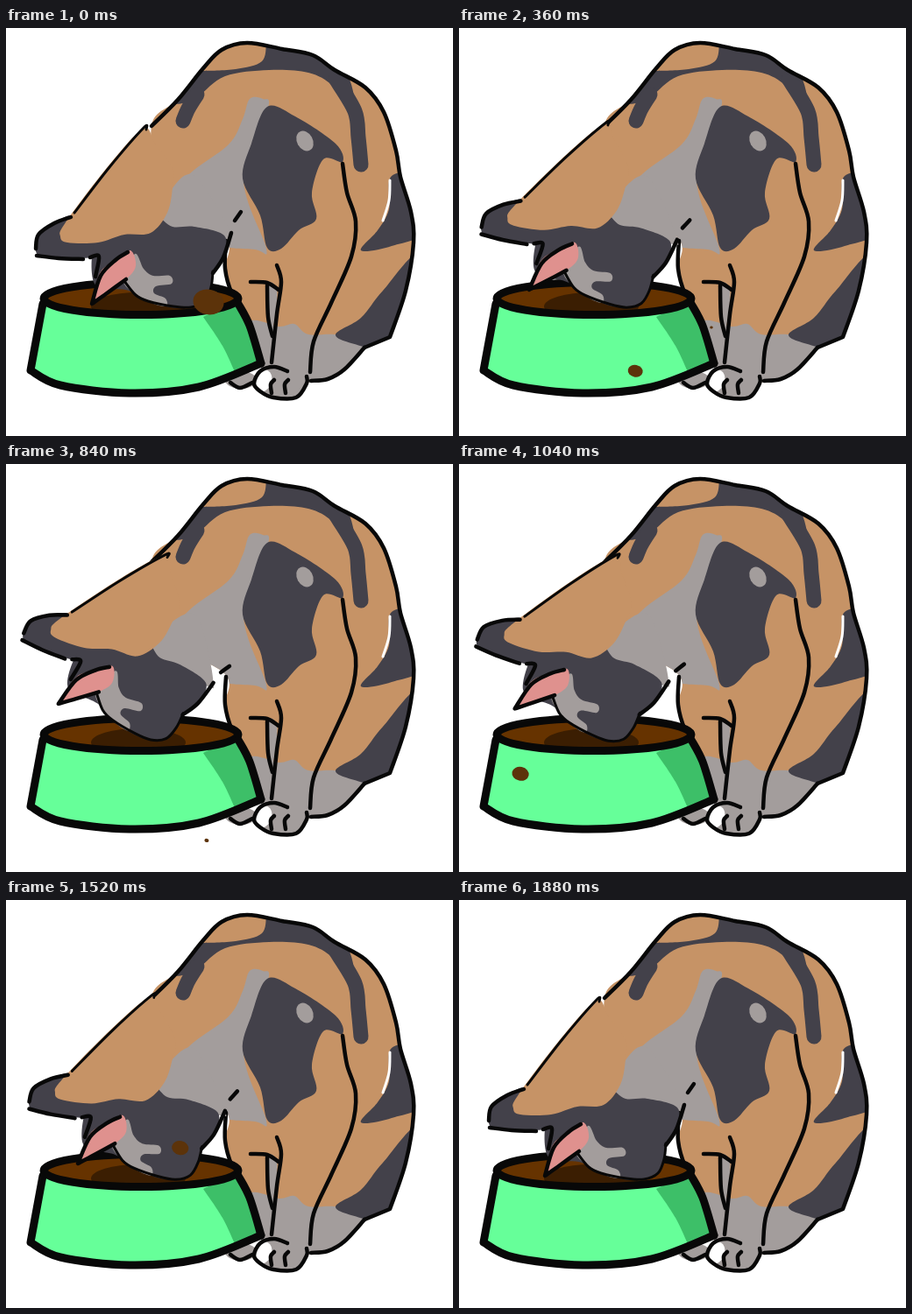
An HTML page with a canvas that plays this animation: 510x466 px, repeating every 1.92 s.

```html
<!DOCTYPE html>
<html>
<head>
<meta charset="utf-8">
<style>
html, body { margin: 0; width: 510px; height: 466px; overflow: hidden; background: #fff }
canvas { display: block }
</style>
</head>
<body>
<canvas id="stage" width="510" height="466"></canvas>
<script>
const c = document.getElementById('stage').getContext('2d');
const LOOP = 1920, STEP = 40, TURN = 20.2 * Math.PI / 180;
const ORANGE = '#c69366', DARK = '#43414a', GREY = '#a39d9c', PINK = '#df918e', INK = '#080808',
  GREEN = '#66ff99', SHADE = '#3dbf68', FOOD = '#663300', GRAVY = '#3b1e02', CRUMB = '#5c330a';

// Smooth curve through points; a repeated point makes a corner.
function curve(p, closed) {
  const n = p.length / 2, path = new Path2D();
  const at = i => {
    const k = closed ? (i + n) % n : Math.min(n - 1, Math.max(0, i));
    return [p[2 * k], p[2 * k + 1]];
  };
  path.moveTo(p[0], p[1]);
  for (let i = 0; i < (closed ? n : n - 1); i++) {
    const [[ax, ay], [x, y], [X, Y], [bx, by]] = [-1, 0, 1, 2].map(k => at(i + k));
    if (x === X && y === Y) continue;
    path.bezierCurveTo(x + (X - ax) / 6, y + (Y - ay) / 6, X - (bx - x) / 6, Y - (by - y) / 6, X, Y);
  }
  return path;
}
function shape(color, ...p) {
  c.fillStyle = color;
  c.fill(curve(p, true));
}
function stroke(color, width, ...p) {
  c.strokeStyle = color;
  c.lineWidth = width;
  c.stroke(curve(p));
}
const line = (...p) => stroke(INK, 4.5, ...p);
function oval(color, x, y, rx, ry, turn = 0) {
  c.fillStyle = color;
  c.beginPath();
  c.ellipse(x, y, rx, ry, turn, 0, 7);
  c.fill();
}

const BACK = [166,112, 196,82, 225,46, 246,25, 275,17, 315,24, 350,31, 375,48, 410,68,
  431,96, 445,140, 450,170, 462,210, 465,245, 456,300, 438,353, 438,353, 409,365];
const HAUNCH = [409,365, 386,390, 367,401, 348,403];
const FRONT = [331,422, 305,422, 284,408, 292,388, 275,335, 258,304, 250,275, 250,240, 180,195];

function drawBody() {
  oval(GREY, 268, 402, 18, 10);
  line(256,405, 267,411, 281,405);
  c.save();
  c.clip(curve([...BACK, ...HAUNCH, ...FRONT], true));
  c.fillStyle = ORANGE;
  c.fillRect(0, 0, 510, 466);
  shape(GREY, 270,341, 312,341, 329,338, 345,350, 380,351, 415,368, 380,440, 250,440);
  // chest and shoulder
  shape(GREY, 278,81, 293,81, 299,92, 271,172, 297,252, 284,253, 230,244, 188,200, 208,168, 254,133, 270,104);
  shape(DARK, 298,90, 330,101, 376,132, 384,153, 362,150, 349,188, 354,218, 334,231, 314,252, 298,251, 290,214, 270,172, 280,132);
  oval(GREY, 341, 129, 9, 12, -.5);
  // back stripe with its two hanging ends
  shape(DARK, 192,84, 223,49, 223,49, 262,47, 292,38, 297,15, 297,15, 350,15, 388,50, 398,95, 373,66, 345,51, 300,48, 250,55, 220,78, 210,84);
  stroke(DARK, 17, 202,106, 208,92, 218,76);
  stroke(DARK, 17, 376,58, 398,95, 402,125, 405,156);
  // flank
  shape(DARK, 440,169, 480,170, 480,230, 440,249, 405,254, 424,231, 437,207);
  shape(DARK, 470,262, 450,380, 410,365, 376,351, 405,331, 430,300);
  stroke('#fff', 3, 438,174, 437,197, 430,220);
  c.restore();

  line(...BACK);
  line(...HAUNCH);
  // legs
  shape(GREY, 300,294, 309,299, 307,330, 302,345);
  line(384,155, 389,188, 399,221, 394,261, 371,314, 351,358, 347,393);
  line(309,271, 314,290, 309,327, 303,382);
  line(279,290, 298,291, 311,299);
  line(298,294, 299,330, 304,352);
  line(251,243, 250,275, 258,304, 276,337);
  // paw
  oval('#fff', 293, 403, 10, 13, .4);
  line(321,392, 306,387, 290,392, 283,406, 290,415, 305,422, 331,422, 343,406, 343,398);
  for (const x of [302, 318]) line(x + 4,402, x,407, x + 1,417);
}

function drawBowl() {
  const side = [265,315, 278,340, 291,383];
  const rim = new Path2D();
  rim.ellipse(154, 309, 111, 18.5, 0, 0, 7);
  const wall = [42,315, 28,391, 28,391, 62,408, 141,417, 220,410, 291,383];
  shape(GREEN, 42,315, 42,315, ...wall.slice(2), 291,383, 278,340, 265,315, 265,315);
  shape(SHADE, 225,330, 225,330, ...side, 291,383, 262,395, 262,395, 247,363);
  c.fillStyle = FOOD;
  c.fill(rim);
  c.save();
  c.clip(rim);
  oval(GRAVY, 151, 318, 54, 16);
  c.restore();
  c.strokeStyle = INK;
  c.lineWidth = 9;
  c.stroke(rim);
  stroke(INK, 9, ...wall);
  stroke(INK, 9, ...side);
}

function drawHead(angle) {
  c.save();
  c.translate(200, 182);
  c.rotate(angle);
  c.translate(-200, -182);
  shape(GREY, 188,186, 208,167, 225,180, 256,232, 248,240, 165,232);
  // ear and face
  shape(DARK, 76,214, 90,230, 106,244, 104,261, 60,262, 36,259, 36,236, 55,223);
  shape(DARK, 104,236, 140,228, 165,228, 173,216, 190,227, 215,227, 249,237, 248,262, 236,278, 234,296, 227,312, 211,319, 183,318, 140,300, 101,292);
  shape(ORANGE, 157,115, 118,156, 68,222, 62,238, 70,245, 105,245, 135,236, 165,234, 184,211, 190,182, 190,160, 170,132);
  shape(GREY, 147,258, 157,275, 168,283, 187,283, 189,292, 171,295, 169,303, 182,309, 182,318, 160,311, 134,290);
  shape(PINK, 98,315, 98,315, 107,280, 125,265, 142,254, 148,272, 136,288, 115,303);
  // contours
  line(34,252, 37,236, 55,223, 74,216);
  line(35,260, 60,263, 88,264);
  line(96,262, 106,261, 102,284);
  stroke(INK, 3, 78,211, 118,159, 157,114, 160,116);
  line(139,256, 125,265, 108,283, 98,315, 98,315, 115,303, 137,287);
  stroke(INK, 3, 135,289, 148,305, 162,312, 191,318, 211,319, 227,312, 234,296, 236,278);
  line(236,280, 248,262, 257,234);
  line(261,220, 268,210);
  c.restore();
}

// Each crumb shoots off, slows down and shrinks away.
const crumbs = [
  { born: 0, life: 400, from: [231, 313], to: [288, 342], size: 16 },
  { born: 160, life: 880, from: [128, 291], to: [229, 430], size: 10 },
  { born: 520, life: 240, from: [195, 310], to: [212, 288], size: 10 },
  { born: 960, life: 400, from: [140, 300], to: [36, 380], size: 11 },
  { born: 1480, life: 200, from: [190, 308], to: [203, 271], size: 11 }
];
function drawCrumb({ born, life, from, to, size }, t) {
  const u = (t - born) / life;
  if (u < 0 || u >= 1) return;
  const out = 1 - (1 - u) ** 5, r = size * (1 - u);
  const [x, y] = from.map((v, i) => v + (to[i] - v) * out);
  oval(CRUMB, x, y, r * 1.1, r * .9, .2);
}

// The head lifts until 880 ms, then sinks back.
const lift = t => TURN * (t < 880 ? t / 880 : (1880 - t) / 1000);

const start = performance.now();
function tick() {
  const t = Math.floor((performance.now() - start) % LOOP / STEP) * STEP;
  c.lineCap = c.lineJoin = 'round';
  c.clearRect(0, 0, 510, 466);
  drawBody();
  drawBowl();
  drawHead(lift(t));
  crumbs.forEach(crumb => drawCrumb(crumb, t));
  requestAnimationFrame(tick);
}
tick();
</script>
</body>
</html>
```
